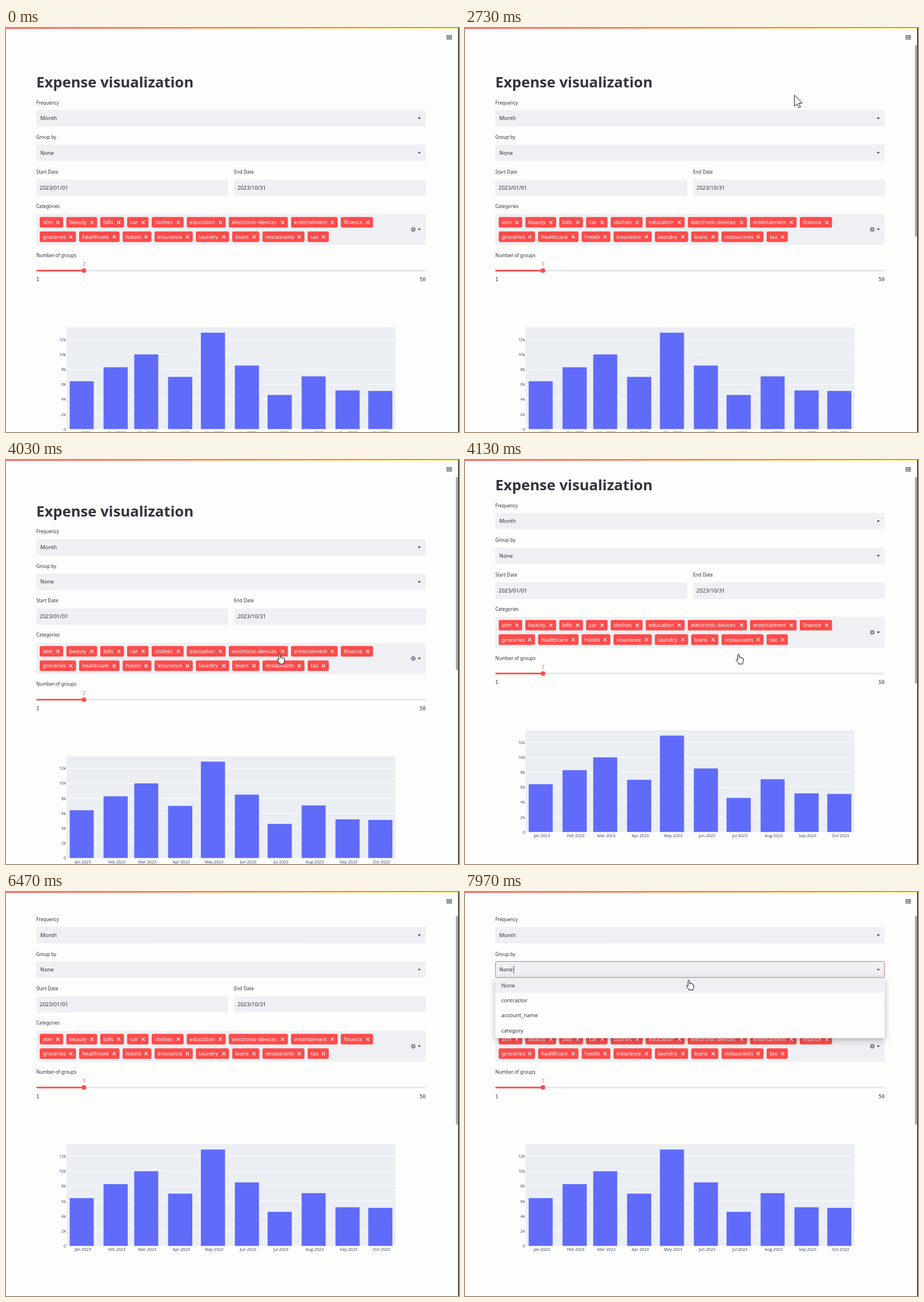
These frames come from a looping animation (793 px wide and 707 px high, 8 s). An HTML page:

```html
<!DOCTYPE html>
<html lang="en">
<head>
<meta charset="utf-8">
<title>Expense visualization</title>
<style>
  html, body { margin: 0; width: 100%; height: 100%; overflow: hidden; background: #fdfdfc; }
  svg { display: block; width: 100%; height: 100%; }
  text { font-family: "Noto Sans", "Open Sans", sans-serif; fill: #31333f; }
  .title { font-size: 25.7px; font-weight: 700; }
  .label { font-size: 8.1px; }
  .value { font-size: 9.4px; }
  .tag { font-size: 9.4px; fill: #fff; }
  .mono { font-family: "DejaVu Sans Mono", monospace; font-size: 8.7px; }
  .tick { font-family: "Open Sans", "Noto Sans", sans-serif; font-size: 7.2px; fill: #2a3f5f; }
  .field { fill: #eef0f3; }
  #menu { filter: drop-shadow(0 3px 6px rgba(0, 0, 0, .28)); }
  #cursor path { fill: #fff; stroke: #111; stroke-width: 1; stroke-linejoin: round; }
</style>
</head>
<body>
<svg viewBox="0 0 793 707" preserveAspectRatio="none">
  <defs>
    <linearGradient id="rainbow">
      <stop offset="0" stop-color="#ff4b4b"/>
      <stop offset="1" stop-color="#fffd80"/>
    </linearGradient>
  </defs>
  <rect width="793" height="707" fill="#fdfdfc"/>
  <g id="page"></g>
  <rect id="thumb" x="787.6" width="3.6" height="365" rx="1" fill="#a9a9a9"/>
  <g id="header">
    <rect width="791.5" height="30" fill="#fdfdfc"/>
    <rect width="791.5" height="1.4" fill="url(#rainbow)"/>
    <path d="M771 13.6h10M771 16.4h10M771 19.2h10" stroke="#31333f" stroke-width="1.2"/>
  </g>
  <rect x="791.6" width="1.4" height="707" fill="#111"/>
  <g id="menu"></g>
  <g id="cursor">
    <path id="arrow" d="M0 0V19.5l4.5-4.2 3 7 3-1.3-3-6.8h6z"/>
    <path id="hand" d="M-1.5 10V1.3a1.4 1.4 0 0 1 2.8 0V6.2l.2-.6a1.3 1.3 0 0 1 2.5.4v.6a1.2 1.2 0 0 1 2.3.3v.6a1.1 1.1 0 0 1 2 .5V12q0 2-1.2 3.4V17H0V15.6Q-1.5 14.5-4 10.6c-1-1.6.8-2.6 2.5-.6z"/>
  </g>
</svg>
<script>
const LOOP = 8000, SCROLL = 82.5, OPEN_AT = 7800;
const $ = id => document.getElementById(id);
const page = $('page'), menu = $('menu');

function add(parent, name, attrs, content) {
  const el = document.createElementNS('http://www.w3.org/2000/svg', name);
  for (const key in attrs) el.setAttribute(key, attrs[key]);
  if (content !== undefined) el.textContent = content;
  return parent.appendChild(el);
}
const text = (parent, cls, x, y, content, anchor = 'start') =>
  add(parent, 'text', { class: cls, x, y, 'text-anchor': anchor }, content);
const rect = (parent, x, y, width, height, attrs) =>
  add(parent, 'rect', { x, y, width, height, ...attrs });
const field = (x, y, width, height) =>
  rect(page, x, y, width, height, { rx: 2.5, class: 'field' });
const caret = y =>
  add(page, 'path', { d: `M720.8 ${y - 1.3}h5.4l-2.7 2.9z`, fill: '#31333f' });
const cross = (x, y, r, width) => add(page, 'path', {
  d: `M${x - r} ${y - r}l${2 * r} ${2 * r}m0 ${-2 * r}l${-2 * r} ${2 * r}`,
  stroke: '#fff', 'stroke-width': width
});

// Form
text(page, 'title', 53, 104, 'Expense visualization');
[['Frequency', 'Month', 143.6], ['Group by', 'None', 204]].forEach(([label, value, y]) => {
  text(page, 'label', 53, y - 10, label);
  field(53, y, 681.5, 28.6);
  text(page, 'value', 60, y + 17.7, value);
  caret(y + 14.5);
});
[['Start Date', '2023/01/01', 53], ['End Date', '2023/10/31', 399.3]].forEach(([label, value, x]) => {
  text(page, 'label', x, 254.7, label);
  field(x, 265, 336, 28.6);
  text(page, 'value', x + 5.8, 282.7, value);
});

// Tags: each row lists left edges, then the right end
text(page, 'label', 53, 314.7, 'Categories');
field(53, 325.3, 681.5, 54.4);
[
  [330.8, 'atm beauty bills car clothes education electronic-devices entertaiment finance',
    [59, 105.6, 165, 212, 255, 316.4, 390, 499, 586, 648]],
  [356, 'groceries healthcare hotels insurance laundry loans restaurants tax',
    [59, 128, 204.2, 260, 332.4, 396, 449, 528, 570.6]]
].forEach(([y, names, edges]) => names.split(' ').forEach((name, i) => {
  const end = edges[i + 1] - 5.5;
  rect(page, edges[i], y, end - edges[i], 18.4, { rx: 2.6, fill: '#ff4b4b' });
  text(page, 'tag', edges[i] + 5.2, y + 12.5, name);
  cross(end - 9.3, y + 9.3, 2.7, 1.2);
}));
add(page, 'circle', { cx: 713, cy: 352.5, r: 3.9, fill: '#808495' });
cross(713, 352.5, 1.4, 0.9);
caret(352.5);

// Slider
text(page, 'label', 53, 400.7, 'Number of groups');
rect(page, 53, 423.2, 681.5, 2.7, { rx: 1.3, fill: '#e4e6ec' });
rect(page, 53, 423.2, 83.5, 2.7, { rx: 1.3, fill: '#ff4b4b' });
add(page, 'circle', { cx: 136.5, cy: 424.6, r: 4, fill: '#ff4b4b' });
text(page, 'mono', 136.5, 416.8, '7', 'middle').style.fill = '#f0606a';
text(page, 'mono', 53, 443.3, '1');
text(page, 'mono', 734.5, 443.3, '50', 'end');

// Bar chart on a date axis
const BASE = 702;
rect(page, 106, 523.6, 576, BASE - 523.6, { fill: '#ebeff3' });
for (let k = 0; k <= 12; k += 2) {
  const y = BASE - k * 13.1;
  rect(page, 106, y - 0.4, 576, 0.9, { fill: '#fff' });
  text(page, 'tick', 105, y + 2.7, k ? k + 'k' : '0', 'end');
}
const heights = [84, 108.5, 131, 91.7, 169, 111.5, 60, 92.6, 68, 67];
'Jan Feb Mar Apr May Jun Jul Aug Sep Oct'.split(' ').forEach((month, i) => {
  const days = (Date.UTC(2023, i) - Date.UTC(2023, 0)) / 864e5;
  const x = 132.5 + days * 1.915;
  rect(page, x - 21.3, BASE - heights[i], 42.6, heights[i],
    { fill: '#606bf9', stroke: '#e5ecf6', 'stroke-width': 0.4 });
  text(page, 'tick', x + 2, 710.8, month + ' 2023', 'middle');
});

// Open select with its list
const focus = add(page, 'g', {});
rect(focus, 53.4, 204, 680.8, 28.4, { rx: 2.5, fill: 'none', stroke: '#f0555a', 'stroke-width': 0.9 });
rect(focus, 85, 211.5, 0.9, 13.5, { fill: '#31333f' });
rect(menu, 53, 150.8, 681.8, 105, { rx: 2.5, fill: '#fdfdfc' });
rect(menu, 53, 150.8, 681.8, 25.7, { fill: '#eef0f3' });
['None', 'contractor', 'account_name', 'category'].forEach((name, i) =>
  text(menu, 'value', 63.6, 166.6 + i * 26.4, name));

// Cursor stops: time, x, y, shape from here on
const runs = [
  [[2470, 640, -6, 'arrow'], [2800, 560, 150, 'arrow'], [3300, 485, 300.5, 'arrow'],
   [3560, 480, 334, 'hand'], [3670, 479, 340, 'hand'], [4490, 479, 340, 'hand'],
   [4630, 474, 258, 'hand'], [4670, 471, 240, 'arrow'], [4800, 455, 175, 'arrow'],
   [4970, 440, 135, 'hand'], [5120, 440, 135, 'hand'], [5260, 448, 90, 'arrow'],
   [5470, 470, -30, 'arrow']],
  [[7470, 470, -6, 'arrow'], [7620, 415, 95, 'arrow'], [7700, 400, 130, 'hand'],
   [7800, 396, 140, 'hand'], [7960, 392, 154.5, 'hand'], [8000, 392, 154.5, 'hand']]
];

const smooth = p => (p = Math.min(1, Math.max(0, p)), p * p * (3 - 2 * p));
const show = (el, on) => { el.style.display = on ? '' : 'none'; };

function cursorAt(t) {
  const run = runs.find(r => t >= r[0][0] && t < r[r.length - 1][0]);
  if (!run) return null;
  const i = run.findIndex(stop => stop[0] > t);
  const [t0, x0, y0, shape] = run[i - 1], [t1, x1, y1] = run[i];
  const p = (t - t0) / (t1 - t0);
  return { x: x0 + (x1 - x0) * p, y: y0 + (y1 - y0) * p, shape };
}

function draw(t) {
  const scroll = SCROLL * smooth((t - 3995) / 235);
  page.setAttribute('transform', `translate(0 ${-scroll})`);
  $('thumb').setAttribute('y', scroll * 0.51);
  show($('thumb'), t >= 2470);
  show(focus, t >= OPEN_AT);
  show(menu, t >= OPEN_AT);
  const c = cursorAt(t);
  show($('cursor'), c);
  if (!c) return;
  $('cursor').setAttribute('transform', `translate(${c.x} ${c.y})`);
  show($('arrow'), c.shape === 'arrow');
  show($('hand'), c.shape === 'hand');
}

const start = performance.now();
function tick() {
  draw((performance.now() - start) % LOOP);
  requestAnimationFrame(tick);
}
tick();
</script>
</body>
</html>
```
